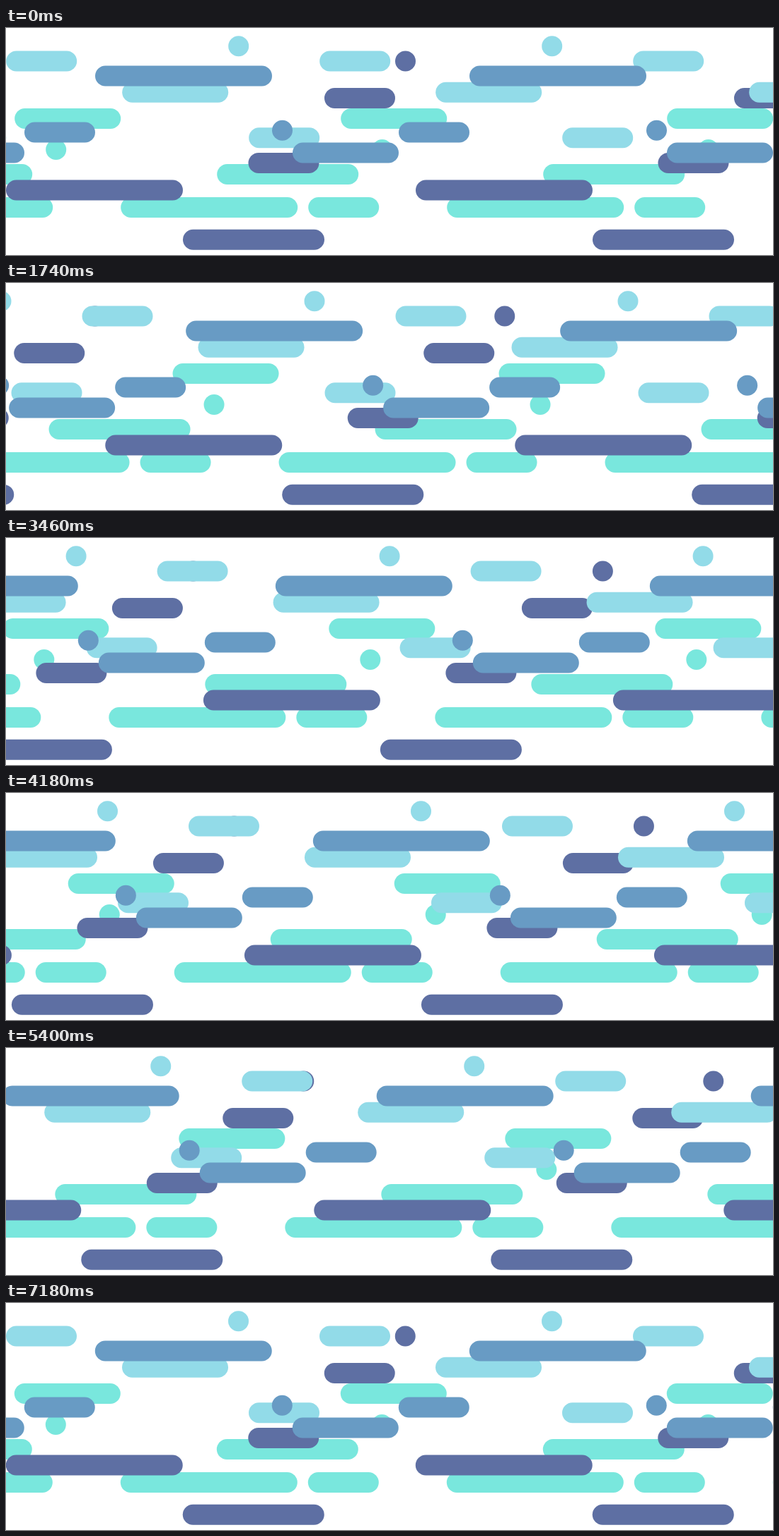
Animation of 1084x322 px, one loop 7.2 s. Source, as an HTML page with a canvas:

```html
<!DOCTYPE html>
<html lang="en">
<head>
<meta charset="utf-8">
<title>Drifting pills</title>
<style>
  html, body { margin: 0; width: 100%; height: 100%; overflow: hidden; background: #fff; }
  canvas { display: block; width: 1084px; height: 322px; }
</style>
</head>
<body>
<canvas id="stage"></canvas>
<script>
const W = 1084, H = 322, LOOP = 7200, TRAVEL = 7183;
const SIZE = 29, UNIT = 50;

// Pill widths are whole units; a dot is as wide as it is high.
const pill = (units, y) => ({ w: units * UNIT, y });
const dot = y => ({ w: SIZE, y });
const gap = w => ({ w });

// Lays parts end to end, each starting where the one before it stops.
function chain(x, ...parts) {
  const placed = [];
  for (const { w, y } of parts) {
    if (y !== undefined) placed.push({ x, y, w });
    x += w;
  }
  return placed;
}

// Back to front; every layer repeats after `period` pixels.
const layers = [
  { color: '#79e7dd', period: 461, turns: 2, parts: [
    ...chain(298.2, pill(4, 193), gap(19), dot(158)),
    ...chain(12.2, pill(3, 114), pill(5, 240), gap(15), pill(2, 240))
  ] },
  { color: '#5e6fa3', period: 579, turns: 1, parts: [
    ...chain(342.5, pill(2, 177)),
    ...chain(0, pill(5, 215.5), pill(4, 285.8), pill(2, 85), dot(32.5))
  ] },
  { color: '#92dbe8', period: 443, turns: 1, parts:
    chain(0.2, pill(2, 32.5), gap(64), pill(3, 76.7), dot(11.3), pill(2, 141.3))
  },
  { color: '#689bc4', period: 529, turns: 1, parts:
    chain(26, pill(2, 133.5), pill(5, 53.5), dot(130.8), pill(3, 162.5))
  }
];

const canvas = document.getElementById('stage');
const ctx = canvas.getContext('2d');
const ratio = window.devicePixelRatio || 1;
canvas.width = W * ratio;
canvas.height = H * ratio;
ctx.scale(ratio, ratio);

function drawLayer({ color, period, turns, parts }, progress) {
  const shift = progress * turns * period;
  ctx.fillStyle = color;
  for (const { x, y, w } of parts) {
    for (let left = (x + shift) % period - period; left < W; left += period) {
      ctx.beginPath();
      ctx.roundRect(left, y, w, SIZE, SIZE / 2);
      ctx.fill();
    }
  }
}

function draw(ms) {
  const progress = Math.min(1, (ms % LOOP) / TRAVEL);
  ctx.fillStyle = '#fff';
  ctx.fillRect(0, 0, W, H);
  for (const layer of layers) drawLayer(layer, progress);
}

let start;
function tick(now) {
  start ??= now;
  draw(now - start);
  requestAnimationFrame(tick);
}
draw(0);
requestAnimationFrame(tick);
</script>
</body>
</html>
```
